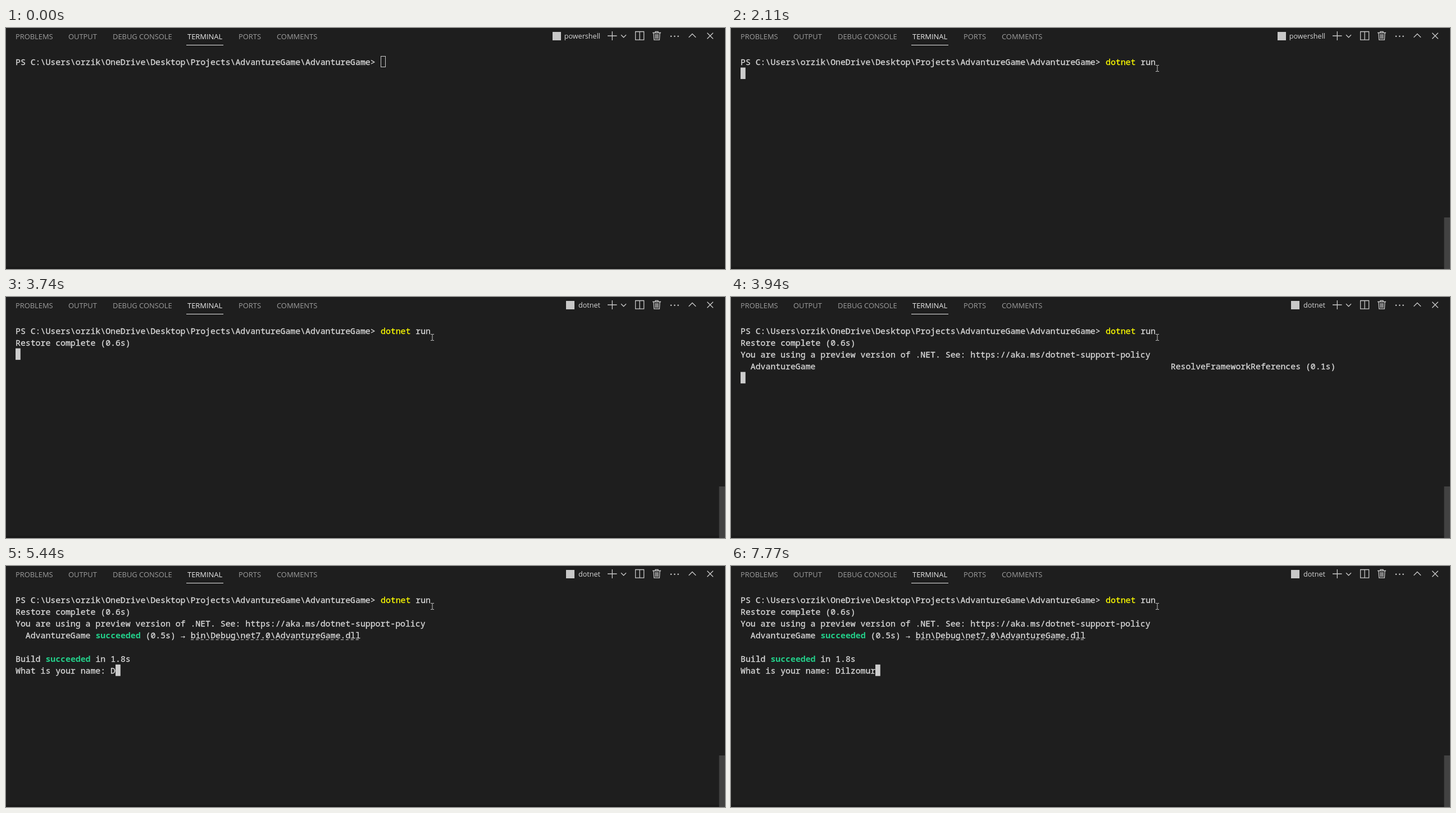
An HTML page that plays this animation: 1280x430 px, repeating every 8000 ms.

```html
<!DOCTYPE html>
<html lang="en">
<head>
<meta charset="utf-8">
<title>Terminal session</title>
<style>
  html, body { margin: 0; width: 100%; height: 100%; overflow: hidden; background: #1e1e1e; }
  svg { display: block; width: 100vw; height: 100vh; }
  text { white-space: pre; }
  .ui { font: 12.9px "Open Sans", "Noto Sans", sans-serif; fill: #9d9d9d; }
  .ui .on { fill: #ececec; }
  #label { font-size: 12.6px; fill: #d4d4d4; text-anchor: end; }
  #lines {
    font: 14.84px "Noto Sans Mono", "DejaVu Sans Mono", monospace;
    fill: #dcdcdc; stroke: #dcdcdc; stroke-width: .3;
  }
  #lines .cmd { fill: #ff0; stroke: #ff0; }
  #lines .ok { fill: #23d18b; stroke: none; font-weight: bold; }
  .icons { fill: none; stroke: #c8c8c8; stroke-width: 1.3; }
  .icons .dot { fill: #c8c8c8; stroke: none; }
</style>
</head>
<body>
<svg viewBox="0 0 1280 430">
  <rect width="1280" height="430" fill="#1e1e1e"/>
  <rect y="426" width="1280" height="4" fill="#191919"/>

  <g class="ui">
    <text x="17" y="20">PROBLEMS</text>
    <text x="111" y="20">OUTPUT</text>
    <text x="190" y="20">DEBUG CONSOLE</text>
    <text x="323" y="20" class="on">TERMINAL</text>
    <text x="414" y="20">PORTS</text>
    <text x="482" y="20">COMMENTS</text>
    <rect x="321" y="30" width="66" height="1" fill="#e7e7e7"/>
    <text id="label" x="1058" y="19"></text>
    <rect id="shell" y="7" width="15" height="15" fill="#c8c8c8"/>
  </g>

  <g class="icons">
    <path d="M1071 14h16.5M1079.3 6v16"/>
    <path d="M1095 12.3l4.5 4.5 4.5-4.5"/>
    <path d="M1120.6 6.5h15v14.6h-15zM1128.1 6.5v14.6"/>
    <path d="M1151 8.5h15M1156 8.3v-2h5v2M1153 8.8l.7 12.4h9.6l.7-12.4M1156.3 10.8v8.5M1158.5 10.8v8.5M1160.7 10.8v8.5"/>
    <path d="M1215.5 16.8l6.3-6.3 6.3 6.3"/>
    <path d="M1248.3 8.7l10.5 10.5M1258.8 8.7l-10.5 10.5"/>
    <circle class="dot" cx="1184" cy="14.7" r="1.3"/>
    <circle class="dot" cx="1190.3" cy="14.7" r="1.3"/>
    <circle class="dot" cx="1196.6" cy="14.7" r="1.3"/>
  </g>

  <g id="lines"></g>
  <path id="link" d="M329 131.5h302" stroke="#c8c8c8" stroke-dasharray="5 3.9"/>
  <rect id="cursor"/>
  <rect id="scroll" x="1269.5" y="338" width="10.5" height="92" fill="#424242"/>
  <g id="pointer">
    <circle id="click" cx="-1.5" cy="-1" r="12" fill="#ff0" fill-opacity=".47"/>
    <path d="M-3 -5.5h2.2l.8 .7 .8-.7h2.2M0 -5v10M-3 5.5h2.2l.8-.7 .8 .7h2.2" fill="none" stroke="#c4c4c4"/>
  </g>
</svg>

<script>
const LOOP = 8000, LEFT = 17, CELL = 8.904, ROW = 21.05, RIGHT_COL = 119;
const PROJECT = "AdvantureGame";
const FOLDER = `C:\\Users\\orzik\\OneDrive\\Desktop\\Projects\\${PROJECT}\\${PROJECT}`;
const PROMPT = `PS ${FOLDER}> `;
const QUESTION = "What is your name: ";
const ANSWER = "Dilzomur";
const KEY_TIMES = [5440, 5690, 5940, 6030, 6120, 6210, 7520, 7770];
const RESOLVE = "ResolveFrameworkReferences";
const TRANSLATE = "TranslateBitbucketGitUrlsInSourceControlInformation";

// [start, task, seconds]
const TASKS = [
  [3170, "Restore", 0.1], [3300, "Restore", 0.2], [3390, "Restore", 0.3],
  [3480, "Restore", 0.4], [3570, "Restore", 0.5],
  [3850, RESOLVE, 0], [3940, RESOLVE, 0.1], [4010, RESOLVE, 0.2],
  [4130, TRANSLATE, 0.2], [4190, TRANSLATE, 0.3], [4260, TRANSLATE, 0.4]
];

const el = id => document.getElementById(id);
const show = (id, on) => el(id).setAttribute("visibility", on ? "visible" : "hidden");
const set = (id, attrs) => {
  for (const name in attrs) el(id).setAttribute(name, attrs[name]);
};
const xAt = col => LEFT + col * CELL;

// Text runs and cursor cell for a moment of the session
function screen(t) {
  const runs = [];
  const put = (row, col, text, kind = "") => runs.push({ row, col, text, kind });
  const cursorAt = (row, col) => ({ runs, row, col });
  const status = row => {
    const [, task, seconds] = TASKS.filter(step => step[0] <= t).pop();
    const text = `${task} (${seconds.toFixed(1)}s)`;
    put(row, RIGHT_COL - text.length, text);
  };

  put(0, 0, PROMPT);
  if (t < 1610) return cursorAt(0, PROMPT.length);
  put(0, PROMPT.length, "dotnet", "cmd");
  put(0, PROMPT.length + 7, "run");
  if (t < 2110) return cursorAt(0, PROMPT.length + 10);
  if (t < 3170) return cursorAt(1, 0);
  if (t < 3660) {
    put(1, 2, `${FOLDER}\\${PROJECT}.csproj`);
    status(1);
    return cursorAt(2, 0);
  }

  put(1, 0, "Restore complete (0.6s)");
  if (t < 3750) return cursorAt(2, 0);
  put(2, 0, "You are using a preview version of .NET. See: https://aka.ms/dotnet-support-policy");
  if (t < 3850) return cursorAt(3, 0);
  put(3, 2, PROJECT);
  if (t < 4310) {
    status(3);
    return cursorAt(4, 0);
  }

  put(3, 16, "succeeded", "ok");
  put(3, 26, "(0.5s)");
  put(3, 33, "→");
  put(3, 35, `bin\\Debug\\net7.0\\${PROJECT}.dll`);
  put(5, 0, "Build");
  put(5, 6, "succeeded", "ok");
  put(5, 16, "in 1.8s");
  if (t < 4690) return cursorAt(6, 0);
  const typed = KEY_TIMES.filter(time => time <= t).length;
  const line = QUESTION + ANSWER.slice(0, typed);
  put(6, 0, line);
  return cursorAt(6, line.length);
}

let drawn = "";
function drawLines(runs) {
  const key = JSON.stringify(runs);
  if (key === drawn) return;
  drawn = key;
  el("lines").replaceChildren(...runs.map(run => {
    const node = document.createElementNS("http://www.w3.org/2000/svg", "text");
    node.setAttribute("x", xAt(run.col));
    node.setAttribute("y", 66 + run.row * ROW);
    node.setAttribute("class", run.kind);
    node.textContent = run.text;
    return node;
  }));
}

function drawCursor(row, col, focused) {
  const x = Math.round(xAt(col)), y = 49.5 + row * ROW;
  set("cursor", focused
    ? { x, y, width: 8.8, height: 20.5, fill: "#ccc", stroke: "none" }
    : { x: x + 0.5, y: y + 1, width: 8, height: 19, fill: "none", stroke: "#ccc" });
}

function drawPointer(t) {
  // The pointer glides in from the top in four even steps
  const p = Math.min(4, Math.floor((t - 240) / 62.5)) / 4;
  const rest = (1 - p) ** 2;
  show("pointer", t >= 240);
  set("pointer", { transform: `translate(${759 + 42 * rest} ${72 - 64 * rest})` });
  set("click", { opacity: t >= 930 && t < 1180 ? 1 : 0 });
  set("scroll", { opacity: t < 240 ? 0 : Math.min(1, 0.4 + p) });
}

function render(t) {
  const { runs, row, col } = screen(t);
  const running = t >= 2560;
  drawLines(runs);
  drawCursor(row, col, t >= 930);
  drawPointer(t);
  show("link", t >= 4310);
  el("label").textContent = running ? "dotnet" : "powershell";
  set("shell", { x: running ? 997 : 973 });
}

let start;
function tick(now) {
  start ??= now;
  render((now - start) % LOOP);
  requestAnimationFrame(tick);
}
render(0);
requestAnimationFrame(tick);
</script>
</body>
</html>
```
